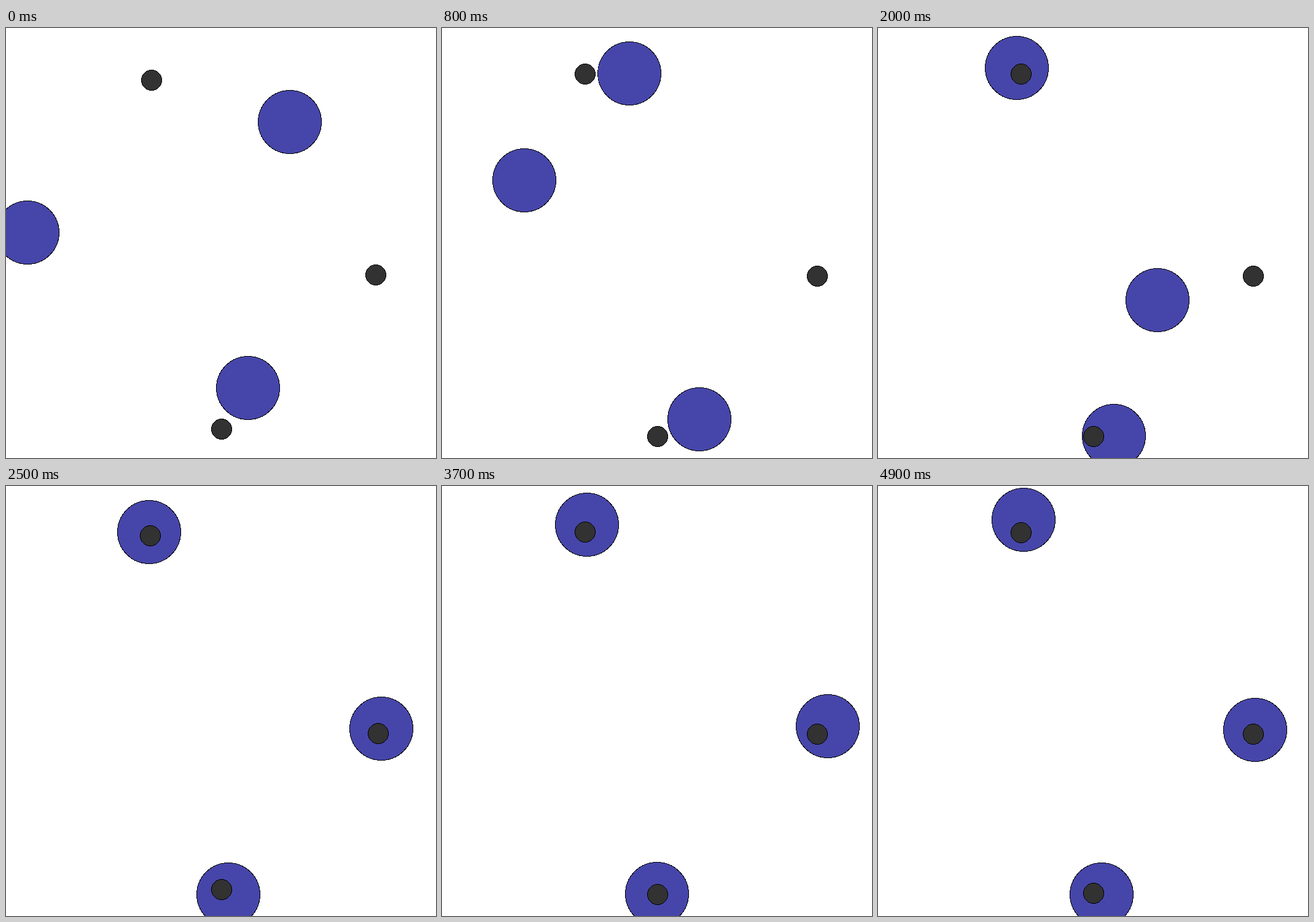
These frames come from a looping animation (700x700 px, 5000 ms). An HTML page:

```html
<!DOCTYPE html>
<html lang="en">
<head>
<meta charset="utf-8">
<title>Agents and landmarks</title>
<style>
  html, body { margin: 0; height: 100%; overflow: hidden; background: white; }
  svg { display: block; width: 100%; height: 100%; }
  circle { stroke: black; shape-rendering: crispEdges; }
</style>
</head>
<body>
<svg id="stage" viewBox="0 0 700 700"></svg>
<script>
const STEP_MS = 100, STEPS = 50;
const CENTER = 350, REACH = 315;

// Waypoints measured from the stage centre, reached at these steps.
const times = [0, 6, 8, 12, 16, 20, 25, 32, 37, 42, 45, 49];
const agents = [
  {
    x: [116.8, -5, -44.5, -140, -122.5, -124, -119.2, -130.9, -114, -101.5, -125, -112.9],
    y: [-204, -248.5, -275.5, -287, -262.5, -285, -280.8, -297.8, -287, -269.5, -283, -295.5]
  },
  {
    x: [-327.1, -214, -215.5, -140, -36.5, 105, 267.5, 258.3, 278, 269.5, 288, 265.4],
    y: [-17.1, -75, -101.5, -40, 72.5, 93, 46.5, 29.8, 41, 42.5, 46, 47.7]
  },
  {
    x: [46.2, 68, 69.5, 54, 50.5, 34, 12.8, 4.6, 0, -2.5, 4, 14.6],
    y: [245.6, 302, 287.5, 313, 310.5, 314, 322.25, 318.5, 314, 309.5, 313, 316.1]
  }
];
const landmarks = [
  { x: -116.9, y: -274.9 },
  { x: 261.98, y: 54.5 },
  { x: 1.5, y: 315 }
];

function addDot(radius, fill) {
  const dot = document.createElementNS(stage.namespaceURI, "circle");
  dot.setAttribute("r", radius);
  dot.setAttribute("fill", fill);
  return stage.appendChild(dot);
}

const stage = document.getElementById("stage");
const dots = [
  ...agents.map(() => addDot(51.5, "#4646aa")),
  ...landmarks.map(() => addDot(16.5, "#323232"))
];

function slope(values, i) {
  const a = Math.max(i - 1, 0), b = Math.min(i + 1, times.length - 1);
  return (values[b] - values[a]) / (times[b] - times[a]);
}

// Smooth cubic curve through the waypoints.
function valueAt(values, step) {
  const next = times.findIndex(t => t >= Math.max(step, 1)), i = next - 1;
  const span = times[next] - times[i];
  const u = (step - times[i]) / span, v = 1 - u;
  const ease = u * u * (u + 3 * v);
  return values[i] + (values[next] - values[i]) * ease +
    span * u * v * (v * slope(values, i) - u * slope(values, next));
}

// The view zooms out so that the farthest dot stays within reach.
function draw(step) {
  const moving = agents.map(({ x, y }) => ({ x: valueAt(x, step), y: valueAt(y, step) }));
  const points = [...moving, ...landmarks];
  const zoom = REACH / Math.max(...points.map(({ x, y }) => Math.max(Math.abs(x), Math.abs(y))));
  const place = v => Math.floor(CENTER + v * zoom + 1e-6);
  points.forEach(({ x, y }, i) => {
    dots[i].setAttribute("cx", place(x));
    dots[i].setAttribute("cy", place(y));
  });
}

const start = performance.now();
function tick() {
  draw(Math.floor((performance.now() - start) / STEP_MS) % STEPS);
  requestAnimationFrame(tick);
}
tick();
</script>
</body>
</html>
```
